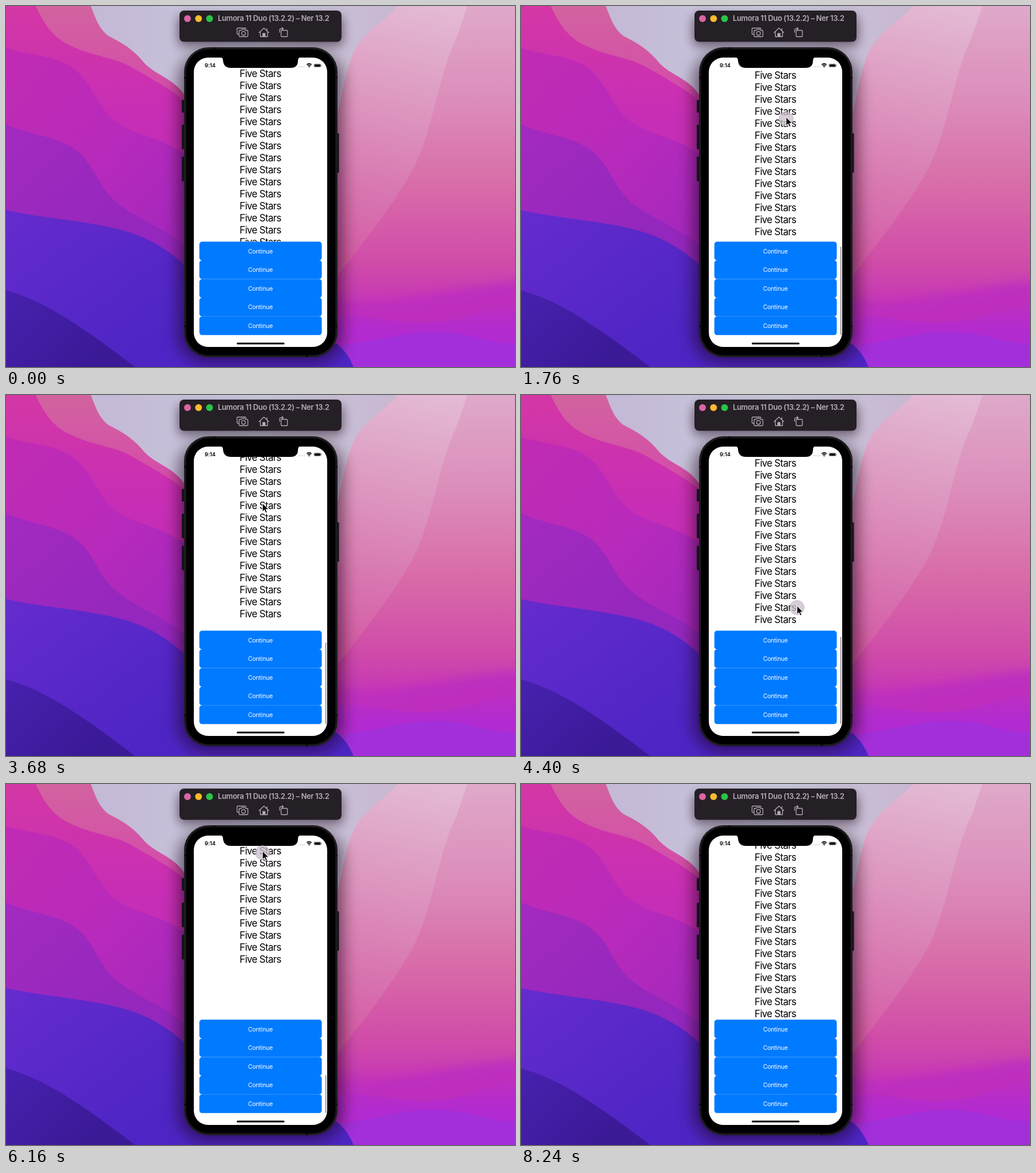
Animation of 889 by 630 pixels, one loop 8320 ms. Source, as an HTML page:

```html
<!DOCTYPE html>
<html lang="en">
<head>
<meta charset="utf-8">
<title>Simulator scroll</title>
<style>
  html, body { margin: 0; width: 100%; height: 100%; overflow: hidden; background: #c4bfd6; }
  svg { display: block; width: 889px; height: 630px; font-family: Inter, "Liberation Sans", sans-serif; }
  .row { font-size: 16.9px; letter-spacing: -.66px; text-anchor: middle; }
  .label { font-size: 10.5px; letter-spacing: -.2px; text-anchor: middle; fill: #fff; }
  .title { font-size: 13px; font-weight: 600; letter-spacing: -.35px; fill: #b8adb7; }
  .clock { font-size: 9.4px; font-weight: 600; letter-spacing: -.1px; }
  .icon { fill: none; stroke: #b5aab4; stroke-width: 1.3; stroke-linejoin: round; stroke-linecap: round; }
</style>
</head>
<body>
<svg viewBox="0 0 889 630">
  <defs>
    <linearGradient id="sky" x1="0" x2="1" y1="0" y2="0">
      <stop offset=".2" stop-color="#c4b9d6"/><stop offset=".5" stop-color="#c9c9de"/><stop offset=".75" stop-color="#c8b8d1"/>
    </linearGradient>
    <linearGradient id="coral" x1="0" x2="0" y1="0" y2="1">
      <stop stop-color="#d2639f"/><stop offset=".3" stop-color="#d546ac"/>
    </linearGradient>
    <linearGradient id="rose" x1="0" x2="0" y1="0" y2="1">
      <stop stop-color="#d437a5"/><stop offset=".3" stop-color="#c72eb5"/><stop offset="1" stop-color="#b02bbb"/>
    </linearGradient>
    <linearGradient id="orchid" gradientUnits="userSpaceOnUse" x1="0" y1="90" x2="310" y2="380">
      <stop stop-color="#c02bb3"/><stop offset=".55" stop-color="#b82abb"/><stop offset="1" stop-color="#a528bd"/>
    </linearGradient>
    <linearGradient id="violet" gradientUnits="userSpaceOnUse" x1="0" y1="210" x2="180" y2="420">
      <stop stop-color="#a32ac0"/><stop offset="1" stop-color="#9427bd"/>
    </linearGradient>
    <linearGradient id="indigo" gradientUnits="userSpaceOnUse" x1="0" y1="360" x2="200" y2="630">
      <stop stop-color="#652bcd"/><stop offset="1" stop-color="#4e25c4"/>
    </linearGradient>
    <linearGradient id="navy" gradientUnits="userSpaceOnUse" x1="0" y1="500" x2="120" y2="630">
      <stop stop-color="#4721ae"/><stop offset="1" stop-color="#3b1a98"/>
    </linearGradient>
    <linearGradient id="blush" gradientUnits="userSpaceOnUse" x1="0" y1="0" x2="0" y2="530">
      <stop stop-color="#dfa9ca"/><stop offset=".3" stop-color="#dc8ebb"/><stop offset=".6" stop-color="#d86ba8"/>
      <stop offset=".85" stop-color="#d04ba9"/><stop offset="1" stop-color="#c334b8"/>
    </linearGradient>
    <linearGradient id="pale" gradientUnits="userSpaceOnUse" x1="720" y1="0" x2="630" y2="450">
      <stop stop-color="#e3b9d3"/><stop offset=".4" stop-color="#dd96bf"/><stop offset="1" stop-color="#d45ba5"/>
    </linearGradient>
    <linearGradient id="bloom" gradientUnits="userSpaceOnUse" x1="0" y1="475" x2="0" y2="570">
      <stop stop-color="#c832b4"/><stop offset="1" stop-color="#b22bd0"/>
    </linearGradient>
    <filter id="soft" x="-30%" y="-30%" width="160%" height="160%"><feGaussianBlur stdDeviation="13"/></filter>
    <filter id="haze" x="-10%" y="-50%" width="120%" height="200%"><feGaussianBlur stdDeviation="9"/></filter>
    <clipPath id="view"><rect x="328" y="90" width="233" height="321"/></clipPath>
    <clipPath id="track"><rect x="550" y="108" width="11" height="466"/></clipPath>
  </defs>

  <!-- wallpaper -->
  <rect width="889" height="630" fill="url(#sky)"/>
  <path d="M684 0C662 28 622 45 604 88C590 125 585 175 572 210L450 260V630H889V0Z" fill="url(#blush)"/>
  <path d="M684 0C662 28 622 45 604 88C590 125 585 175 572 210V480C610 430 668 360 708 290C748 215 752 128 787 55L806 0Z" fill="url(#pale)"/>
  <path d="M560 512C640 530 720 500 900 480V640H560Z" fill="#bd2fbf" filter="url(#haze)"/>
  <path d="M570 543C630 533 670 556 735 553C800 552 840 526 889 522V630H570Z" fill="url(#bloom)"/>
  <path d="M570 592C640 590 690 566 760 569C815 572 855 592 889 588V630H570Z" fill="#a22fd9"/>
  <path d="M0 0H148C157 22 162 40 180 53C208 67 223 77 243 101C264 122 299 129 314 160L450 260V630H0Z" fill="url(#coral)"/>
  <path d="M0 0H52C64 25 76 49 106 66C150 89 190 88 225 110C259 130 287 145 312 165L450 300V630H0Z" fill="url(#rose)"/>
  <path d="M0 73C40 87 82 85 114 106C151 132 158 177 193 203C230 229 270 226 312 260L450 400V630H0Z" fill="url(#orchid)"/>
  <path d="M0 206C35 224 78 225 114 246C154 270 156 309 190 340C224 370 270 384 312 418L450 520V630H0Z" fill="url(#violet)"/>
  <path d="M0 356C64 371 130 373 198 390C246 402 281 424 312 452L450 530L578 590Q596 603 607 630H0Z" fill="url(#indigo)"/>
  <path d="M0 496C75 516 151 574 226 630H0Z" fill="url(#navy)"/>

  <!-- device -->
  <rect x="301" y="82" width="288" height="540" rx="48" fill="#140510" opacity=".52" filter="url(#soft)"/>
  <rect x="300" y="17" width="289" height="53" rx="10" fill="#140510" opacity=".5" filter="url(#haze)"/>
  <g fill="#151317">
    <rect x="307" y="164" width="6" height="22" rx="1.5"/>
    <rect x="307" y="207" width="6" height="43" rx="1.5"/>
    <rect x="307" y="263" width="6" height="43" rx="1.5"/>
    <rect x="576" y="222" width="5.5" height="69" rx="1.5"/>
  </g>
  <rect x="311" y="72" width="268" height="541" rx="43" fill="#1d1b1f"/>
  <rect x="314.500" y="75.500" width="261" height="534" rx="39.500" fill="#000"/>
  <path d="M364 72v4M525 609v4M311 125h4M575 125h4M311 559h4M575 559h4" stroke="#09080a" stroke-width="3"/>
  <rect x="328" y="90" width="233" height="505" rx="25" fill="#fff"/>

  <g clip-path="url(#view)"><g id="rows"></g></g>
  <g id="buttons"></g>
  <g clip-path="url(#track)"><rect id="bar" x="557.500" width="2.200" height="161" rx="1.100" fill="#000" opacity="0"/></g>

  <path d="M374 89Q379 90 379 95Q380 108 393 108H497Q510 108 510 95Q510 90 515 89Z"/>
  <text class="clock" x="347" y="107.300">9:14</text>
  <g fill="#c9c7ca"><circle cx="512" cy="106" r=".9"/><circle cx="515" cy="106" r=".9"/><circle cx="518" cy="106" r=".9"/><circle cx="521" cy="106" r=".9"/></g>
  <g fill="none" stroke="#000" stroke-width="1.500">
    <path d="M525.200 102.500Q529.500 98.800 533.800 102.500M526.800 104.500Q529.500 102.200 532.200 104.500"/>
  </g>
  <path d="M528 105.700Q529.500 104.700 531 105.700L529.500 107.400Z"/>
  <rect x="537.700" y="100.800" width="12.600" height="6.200" rx="1.800" fill="none" stroke="#888" stroke-width=".6"/>
  <rect x="538.600" y="101.700" width="10.800" height="4.400" rx="1"/>
  <path d="M551.300 102.800v2" stroke="#888"/>
  <rect x="403" y="587.500" width="83.500" height="3" rx="1.500"/>

  <!-- toolbar -->
  <rect x="303" y="8" width="283" height="54.500" rx="8" fill="#251f26"/>
  <circle cx="317" cy="22" r="6" fill="#da66a5"/>
  <circle cx="336.300" cy="22" r="6" fill="#fdbb2d"/>
  <circle cx="355.500" cy="22" r="6" fill="#2ac445"/>
  <text class="title" x="370" y="26">Lumora 11 Duo (13.2.2) – Ner 13.2</text>
  <g class="icon">
    <path d="M406 49.500H405Q403.500 49.500 403.500 48V40Q403.500 38.500 405 38.500H417.500Q419 38.500 419 40"/>
    <path d="M408.500 42.500H411L412.200 40.800H417.300L418.500 42.500H421Q422.500 42.500 422.500 44V52Q422.500 53.500 421 53.500H408.500Q407 53.500 407 52V44Q407 42.500 408.500 42.500Z"/>
    <circle cx="414.800" cy="47.700" r="3.300"/>
    <path d="M442 46.500L450.500 38.500L459 46.500M444.300 45V53.500H456.700V45M455.700 42.500V39.500"/>
    <path d="M448.500 53V48H452.500V53Z" fill="#b5aab4"/>
    <rect x="480.500" y="42.500" width="11" height="11" rx="1.300"/>
    <path d="M478 46V42Q478 39.700 480.300 39.700H484M482 37.500L484.300 39.700L482 42"/>
  </g>

  <circle id="touch" r="12.500" fill="#c9bccb" fill-opacity=".75" stroke="#a89bab" stroke-opacity=".7" stroke-width=".8"/>
  <path id="cursor" d="M0 0V14.800L3.400 11.600L5.700 17L8.200 15.900L5.900 10.700H10.600Z" fill="#000" stroke="#fff" stroke-width="1" stroke-linejoin="round"/>
</svg>

<script>
const LOOP = 8320, STEP = 80;
const ROWS = 56, PITCH = 21, END = 872;
const $ = id => document.getElementById(id);

function add(parent, tag, attrs, text) {
  const el = document.createElementNS("http://www.w3.org/2000/svg", tag);
  for (const name in attrs) el.setAttribute(name, attrs[name]);
  if (text) el.textContent = text;
  parent.append(el);
}

for (let i = 0; i < ROWS; i++) {
  add($("rows"), "text", { class: "row", x: 444.3, y: 124 + i * PITCH }, "Five Stars");
}
for (let i = 0; i < 5; i++) {
  const y = 411.3 + i * 32.6;
  add($("buttons"), "rect", { x: 337.7, y, width: 213.8, height: 32.6, rx: 4.7, fill: "#007aff" });
  add($("buttons"), "text", { class: "label", x: 444.3, y: y + 20.2 }, "Continue");
}

// [time, values...]
const scroll = [
  [320, 0], [1120, 330], [1520, 872], [1600, 888], [1760, END + 7], [2000, END],
  [2960, END], [3360, END + 82], [3680, END + 19], [3920, END],
  [4320, END], [4720, END + 86], [5040, END + 2], [5120, END],
  [5680, END], [6160, END + 95], [6320, END + 97], [6880, END]
];
const pointer = [
  [240, 470, 400], [320, 470, 392], [640, 465, 200], [1120, 462, 392], [1200, 462, 390],
  [1680, 463, 194], [1840, 463, 194], [2880, 445, 380], [2960, 445, 378],
  [3360, 448, 189], [3680, 448, 189], [4240, 478, 390], [4320, 480, 388],
  [4880, 517, 27], [5120, 517, 27], [5600, 446, 336], [5680, 446, 334],
  [6160, 448, 117], [6320, 448, 115], [7000, 448, 240]
];
const presses = [[320, 640], [1200, 1840], [2960, 3360], [4320, 5120], [5680, 6320]];

const clamp = v => Math.min(1, Math.max(0, v));

function sample(keys, t) {
  const i = keys.findIndex(k => k[0] > t);
  if (i === 0) return keys[0].slice(1);
  if (i < 0) return keys[keys.length - 1].slice(1);
  const a = keys[i - 1], b = keys[i];
  const p = (t - a[0]) / (b[0] - a[0]);
  const e = p * p * (3 - 2 * p);
  return a.slice(1).map((v, n) => v + (b[n + 1] - v) * e);
}

function draw(t) {
  const [offset] = sample(scroll, t);
  const [x, y] = sample(pointer, t);
  $("rows").setAttribute("transform", `translate(0 ${-offset})`);

  // the bar is squeezed against the track's end while overscrolled
  const over = Math.max(0, offset - END);
  const top = 110 + 303 * Math.min(1, offset / END) + over;
  $("bar").setAttribute("y", top);
  $("bar").setAttribute("height", 161 - over);
  $("bar").setAttribute("opacity", 0.36 * Math.min(clamp((t - 320) / 160), clamp((7440 - t) / 320)));

  const shown = t >= 240 && t < 7000;
  $("cursor").setAttribute("visibility", shown ? "visible" : "hidden");
  $("cursor").setAttribute("transform", `translate(${x} ${y})`);

  const down = presses.some(([from, to]) => t >= from && t < to);
  $("touch").setAttribute("visibility", down ? "visible" : "hidden");
  $("touch").setAttribute("cx", x);
  $("touch").setAttribute("cy", Math.max(90, y + 3));
}

const start = performance.now();
function tick() {
  const t = (performance.now() - start) % LOOP;
  draw(Math.floor(t / STEP) * STEP);
  requestAnimationFrame(tick);
}
tick();
</script>
</body>
</html>
```
